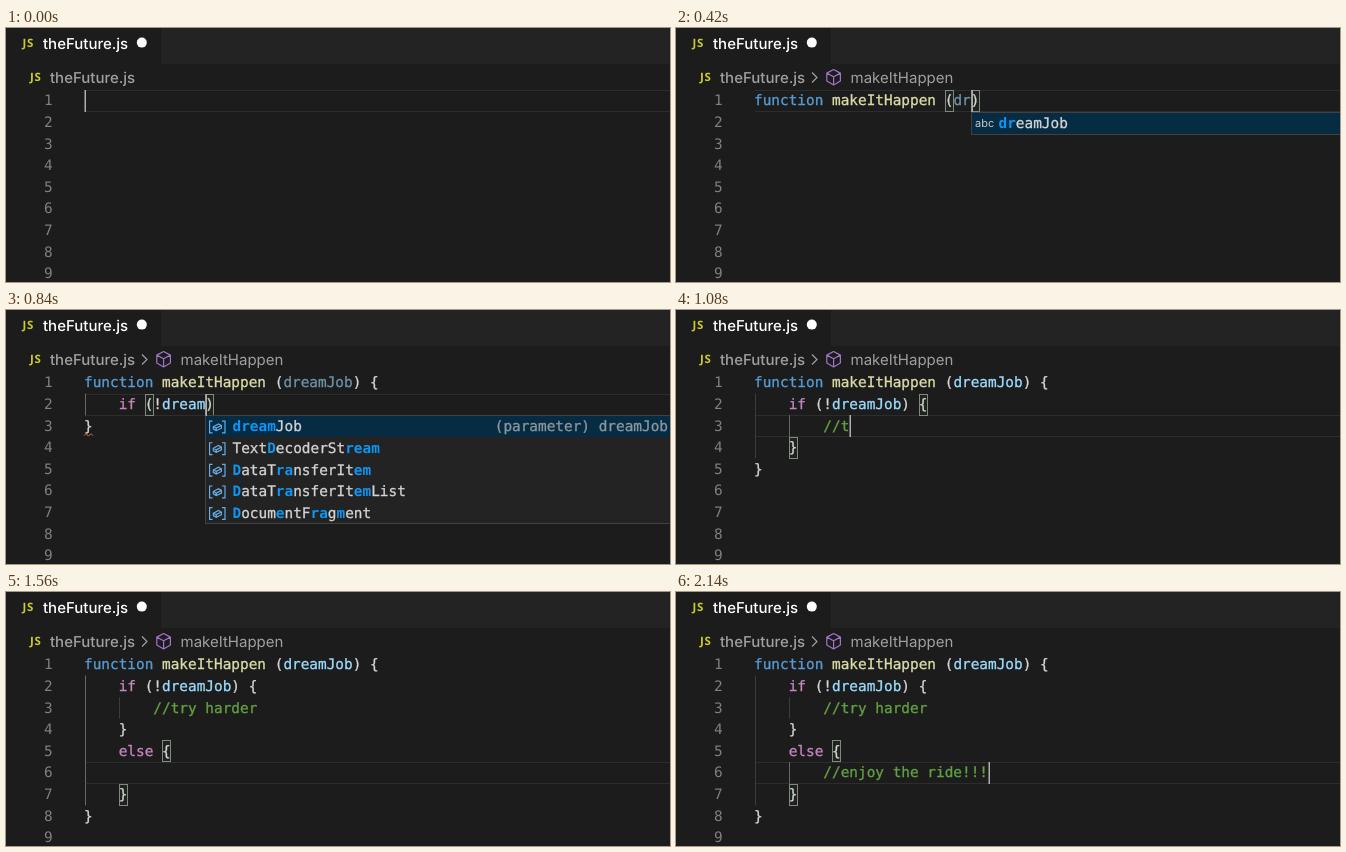
These frames come from a looping animation (664 by 254 pixels, 2.16 s). An HTML page:

```html
<!DOCTYPE html>
<html lang="en">
<head>
<meta charset="utf-8">
<title>theFuture.js</title>
<style>
html, body { margin: 0; width: 100%; height: 100%; overflow: hidden; background: #1c1c1c; }
svg { display: block; width: 664px; height: 254px; }
text { white-space: pre; text-rendering: geometricPrecision; }
.code { font: 14.4px "DejaVu Sans Mono", "Liberation Mono", monospace; stroke-width: .3px; }
.ui { font: 15px Inter, Roboto, sans-serif; }
.file { font-weight: 500; }
.js { font: 700 11.5px "Open Sans", Lato, sans-serif; letter-spacing: .6px; fill: #cbcb30; }
.abc { font: 11px Inter, Roboto, sans-serif; fill: #c5c5c5; }
.hit { font-weight: 700; fill: #0b97f5; stroke: none; }
</style>
</head>
<body>
<svg viewBox="0 0 664 254">
  <rect width="664" height="254" fill="#1c1c1c"/>
  <rect x="155" width="509" height="36" fill="#232323"/>
  <text class="js" x="16.5" y="18.7">JS</text>
  <text class="ui file" x="37" y="20.5" fill="#fff">theFuture.js</text>
  <circle cx="135.8" cy="14.6" r="5" fill="#fff"/>
  <text class="js" x="24" y="52.5">JS</text>
  <text class="ui file" x="44" y="54.5" fill="#a0a0a0">theFuture.js</text>
  <g id="crumb" fill="none">
    <path d="M136 44.5l5 5-5 5" stroke="#a0a0a0" stroke-width="1.2"/>
    <path d="M157.6 41.5l6.8 3.6v8l-6.8 3.8-6.8-3.8v-8zM150.8 45.1l6.8 3.6 6.8-3.6M157.6 48.7v8.2"
          stroke="#a274c9" stroke-width="1.2" stroke-linejoin="round"/>
    <text id="symbol" class="ui" x="174.5" y="54.5" fill="#a0a0a0"></text>
  </g>
  <g id="numbers"></g>
  <g id="editor"></g>
</svg>
<script>
const STEP = 20, FRAMES = 108;
const LEFT = 78, CHAR = 8.669, TOP = 61.9, ROW = 21.63;
const $ = id => document.getElementById(id);
const colX = col => LEFT + col * CHAR;
const rowY = row => TOP + row * ROW;
const edgeX = col => Math.ceil(colX(col) + .3);

// [first step, last step, keys]; "↓" jumps behind the next closing brace
const KEYS = [
  [0, 12, "function makeItH"],
  [12, 31, "appen (dreamJob) {\n"],
  [32, 42, "if (!dream"],
  [42, 50, "Job) {\n"],
  [50, 64, "//try harder"],
  [66, 67, "↓"],
  [68, 70, "\n"],
  [70, 76, "else {"],
  [76, 77, "\n"],
  [79, 106, "//enjoy the ride!!!"]
];

// asterisks surround the matched letters
const PARAMETER = [
  "Text*D*ecoderSt*ream*", "*D*ataT*ra*nsferIt*em*",
  "*D*ataT*ra*nsferIt*em*List", "*D*ocum*e*ntF*ra*g*m*ent"
];
const WORDS = {
  function: ["function", "Function", "false", "fetch", "finally", "focus", "for", "frames"],
  if: ["if", "ifelse", "import", "in", "Infinity", "innerHeight", "instanceof"],
  else: ["else", "Element", "encodeURI", "eval", "event", "export"]
};
const COLORS = { function: "#569cd6", if: "#c586c0", else: "#c586c0" };

const clamp = v => Math.max(0, Math.min(1, v));

function typedAt(step) {
  return KEYS.map(([a, b, s]) =>
    s.slice(0, Math.floor(s.length * clamp((step - a) / (b - a)) + 1e-6))).join("");
}

// Plays the keys with automatic closing brackets and indentation.
function edit(keys) {
  let before = "", after = "";
  for (const key of keys) {
    if (key === "\n") {
      const indent = before.split("\n").pop().match(/^ */)[0];
      const block = before.endsWith("{");
      before += "\n" + indent + (block ? "    " : "");
      if (block) after = "\n" + indent + after;
    } else if (key === "↓") {
      const end = after.indexOf("}") + 1;
      before += after.slice(0, end);
      after = after.slice(end);
    } else {
      before += key;
      if (key === "(") after = ")" + after;
      if (key === "{") after = "}" + after;
      if (key === ")") after = after.slice(1);
    }
  }
  return { before, after };
}

function place(text) {
  const lines = text.split("\n");
  return { row: lines.length - 1, col: lines.pop().length };
}

function findPair(doc, cursor) {
  const at = /[)}]/.test(doc[cursor - 1] || "") ? cursor - 1 : cursor;
  let depth = 0, open = at - 1;
  for (; open >= 0; open--) {
    if (/[)}]/.test(doc[open])) depth++;
    else if (/[({]/.test(doc[open]) && depth-- === 0) break;
  }
  if (open < 0) return [];
  depth = 0;
  for (let i = open; i < doc.length; i++) {
    if (/[({]/.test(doc[i])) depth++;
    if (/[)}]/.test(doc[i]) && --depth === 0) return [open, i];
  }
  return [];
}

const box = (x, y, w, h, attrs) =>
  `<rect x="${x}" y="${y}" width="${w}" height="${h}" ${attrs}/>`;
const code = (x, y, text, fill, more = "") =>
  `<text class="code" x="${x}" y="${y + 15.4}" fill="${fill}" ${more}>${text}</text>`;

function drawLine(line, row, used) {
  let out = "";
  for (const m of line.matchAll(/\/\/.*|\w+|[^\s\w]/g)) {
    const word = m[0];
    let fill = "#d4d4d4", more = "";
    if (word.startsWith("//")) fill = "#62a142";
    else if (/\w/.test(word)) {
      fill = COLORS[word] || "#9cdcfe";
      if (row === 0 && m.index === 9) fill = "#dcdcaa";
      if (row === 0 && m.index > 20 && !used) more = 'opacity=".62"';
    }
    out += code(colX(m.index), rowY(row), word, fill, `${more} stroke="${fill}"`);
  }
  return out;
}

// Blank lines take the depth of the line below.
function drawGuides(lines, activeRow) {
  const depths = lines.map((line, i) =>
    (line.trim() ? line : lines[i + 1] || "").match(/^ */)[0].length / 4);
  const level = depths[activeRow] - 1;
  let out = "";
  depths.forEach((depth, row) => {
    for (let i = 0; i < depth; i++) {
      const active = i === level && (i === 0 || row === activeRow);
      out += box(edgeX(i * 4), rowY(row), 1, ROW, `fill="${active ? "#686868" : "#3c3c3c"}"`);
    }
  });
  return out;
}

function suggestions(line, row) {
  const word = (line.match(/\w+$/) || [""])[0];
  if (!word || line.includes("//")) return null;
  const mark = s => `*${s.slice(0, word.length)}*${s.slice(word.length)}`;
  for (const name of ["makeItHappen", "dreamJob"]) {
    if (!name.startsWith(word)) continue;
    if (name === word) return null;
    if (row === 0) return { icon: "abc", items: [mark(name)] };
    return {
      icon: "var", note: "(parameter) dreamJob",
      items: [mark(name), ...(word.length < 6 ? PARAMETER : [])]
    };
  }
  const full = Object.keys(WORDS).find(k => k.startsWith(word));
  if (!full) return null;
  const items = WORDS[full].filter(s => s.toLowerCase().startsWith(word)).map(mark);
  return { icon: "var", items };
}

function drawIcon(kind, x, y) {
  if (kind === "abc") return `<text class="abc" x="${x + 3}" y="${y + 14.5}">abc</text>`;
  return `<path transform="translate(${x + 3} ${y + 5})" fill="none" stroke="#65aeea" stroke-width="1.2"
    d="M3.5 .6H.6V12.4H3.5M13 .6H16V12.4H13M4.3 6.2L9.5 3.4 12.4 5V7.7L7.2 10.2 4.3 8.6ZM4.3 6.2L7.2 7.6 12.4 5M7.2 7.6V10.2"/>`;
}

function drawPopup({ icon, items, note }, row, col) {
  const x = Math.round(colX(col)) + 1, y = Math.round(rowY(row + 1)) + 1;
  const light = "#d4d4d4", gray = "#8c979e";
  let out = box(x - .5, y - .5, 480, Math.round(items.length * ROW),
    'fill="#232324" stroke="#414141"');
  out += box(x, y, 480, ROW - 1, 'fill="#062c44"');
  items.forEach((item, i) => {
    const label = item.split("*").map((part, n) =>
      n % 2 ? `<tspan class="hit">${part}</tspan>` : part).join("");
    out += drawIcon(icon, x, y + i * ROW - .5);
    out += code(x + 26.5, y + i * ROW, label, light, `stroke="${light}"`);
  });
  if (note) out += code(662, y, note, gray, `text-anchor="end" stroke="${gray}"`);
  return out;
}

function render(step) {
  const keys = typedAt(step);
  const { before, after } = edit(keys);
  const doc = before + after, lines = doc.split("\n");
  const { row, col } = place(before);
  const current = before.split("\n").pop();

  const name = keys.slice(9, Math.min(21, keys.length - 1));
  $("symbol").textContent = name;
  $("crumb").style.display = name ? "" : "none";

  let out = "";
  for (const y of [rowY(row), rowY(row + 1) - .6])
    out += box(79, Math.round(y), 585, 1, 'fill="#2d2d2d"');
  out += drawGuides(lines, row);
  for (const at of findPair(doc, before.length)) {
    const p = place(doc.slice(0, at));
    out += box(Math.round(colX(p.col)) + .5, Math.round(rowY(p.row)) + .5, 8, 21,
      'fill="#1c251c" stroke="#858585"');
  }
  lines.forEach((line, i) => out += drawLine(line, i, doc.includes("!dreamJob")));

  if (doc.includes("if (") && !/if .*\{/.test(doc)) {
    const y = rowY(lines.length - 1) + 19;
    out += `<path d="M78 ${y + 1.5}l2-2 2.5 2.5 2.5-2.5 2 2" fill="none" stroke="#d8694f"/>`;
  }
  const list = suggestions(current, row);
  if (list) out += drawPopup(list, row, col);
  if (step < 77 || step > 79)
    out += box(edgeX(col) - .5, Math.round(rowY(row)), 1.5, 22, 'fill="#aeafad"');
  $("editor").innerHTML = out;
}

$("numbers").innerHTML = Array.from({ length: 9 }, (_, i) =>
  code(38, rowY(i), i + 1, "#808080")).join("");

let last = -1;
function tick() {
  const step = Math.floor(performance.now() / STEP) % FRAMES;
  if (step !== last) render(last = step);
  requestAnimationFrame(tick);
}
tick();
</script>
</body>
</html>
```
